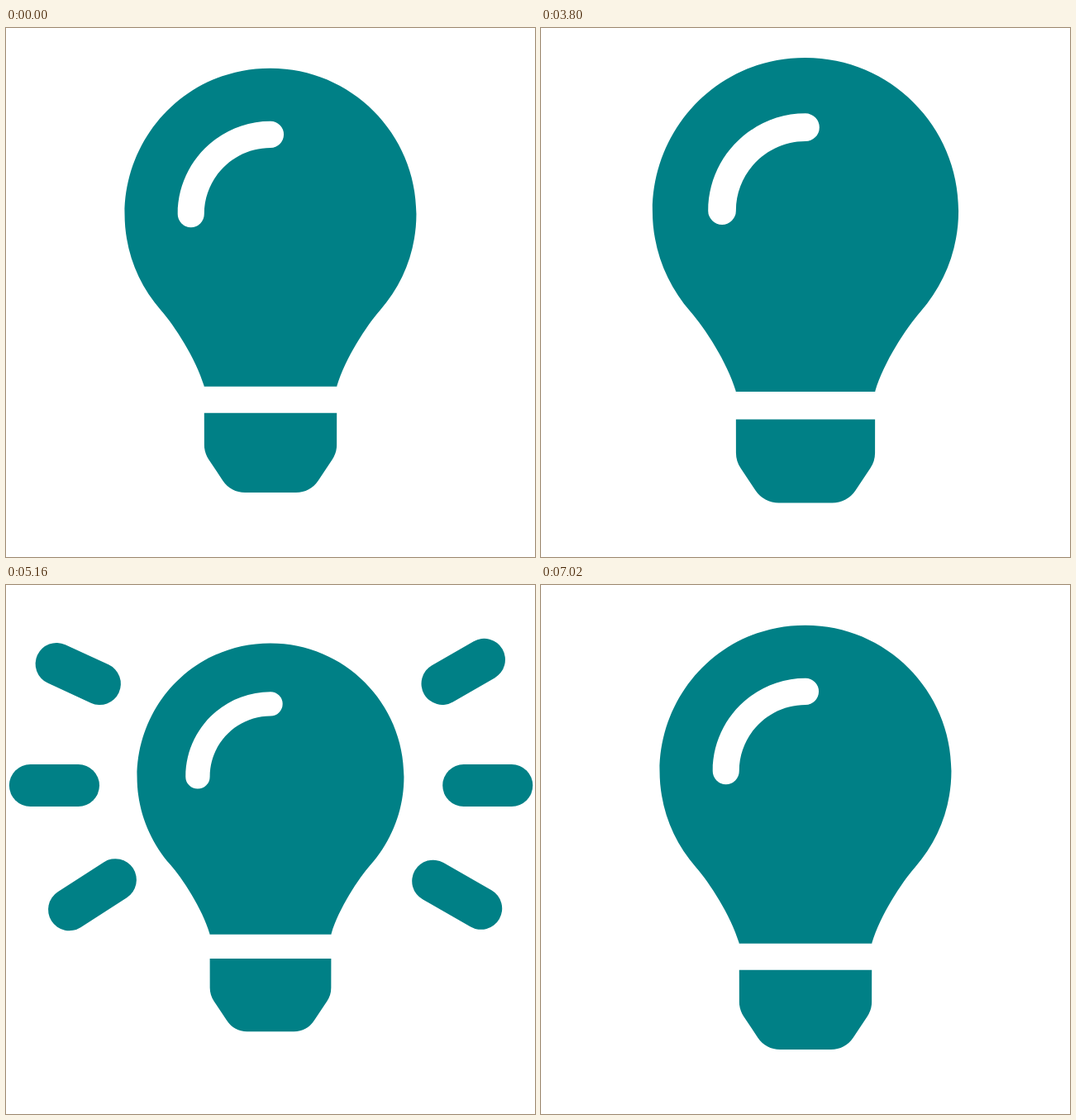
Write an HTML page that moves like this. It is 640 px wide and 640 px high and loops after 7.32 s.

```html
<!DOCTYPE html>
<html lang="en">
<head>
<meta charset="utf-8">
<title>Light bulb</title>
<style>
  html, body { margin: 0; height: 100%; overflow: hidden; background: #fff; }
  svg { display: block; width: 100vw; height: 100vh; }
  #bulb { fill: #008086; }
  #rays { fill: none; stroke: #008086; stroke-width: 51; stroke-linecap: round; }
</style>
</head>
<body>
<svg viewBox="0 0 640 640">
  <g id="rays">
    <path pathLength="1" d="M113.4 119.5L59.3 94.6"/>
    <path pathLength="1" d="M87.5 242.5H27.4"/>
    <path pathLength="1" d="M132.4 356.7L74.6 394"/>
    <path pathLength="1" d="M528 119.4L580.2 89.3"/>
    <path pathLength="1" d="M553.7 242.5H613.8"/>
    <path pathLength="1" d="M516.7 358.2L576.7 392.5"/>
  </g>
  <path id="bulb" d="M96.06 454.35c.01 6.29 1.87 12.45 5.36 17.69l17.09 25.69a32 32 0 0 0 26.64 14.28h61.71
    a32 32 0 0 0 26.64-14.28l17.09-25.69a32 32 0 0 0 5.36-17.69L256 416H96z
    M0 176c0 44.37 16.45 84.85 43.56 115.78 16.52 18.85 42.36 58.23 52.21 91.45l.11.78h160.24l.11-.78
    c9.85-33.22 35.69-72.6 52.21-91.45C335.55 260.85 352 220.37 352 176 352 78.61 272.91-.3 175.45 0
    73.44.31 0 82.97 0 176z
    M176 96c-44.11 0-80 35.89-80 80a16 16 0 0 1-32 0c0-61.76 50.24-112 112-112a16 16 0 0 1 0 32z"/>
</svg>
<script>
const LOOP = 7320, START = 2360, BEAT = 560;
const BEAT_STEPS = [0, 140, 180, 320, 440];

// Key poses of the pulse; soft blends from linear (0) to smooth (1) on the way to the next.
const PULSE = [
  { step: 0, scale: 1.0026, soft: .3 },
  { step: 4, scale: .954, soft: 0 },
  { step: 5.6, scale: .953, soft: .3 },
  { step: 18.5, scale: 1.1, soft: 1 },
  { step: 27, scale: .91, soft: 0 },
  { step: 33, scale: 1.0026, soft: 0 }
];

const bulb = document.getElementById('bulb');
const rays = document.getElementById('rays');

const mix = (a, b, k) => a + (b - a) * k;
const progress = (from, to, x) => Math.min(1, Math.max(0, (x - from) / (to - from)));
const smooth = x => x * x * (3 - 2 * x);
const easeOut = x => 1 - (1 - x) ** 5;

// The picture advances in uneven holds, five to a beat.
function stepAt(time) {
  const t = time - START;
  if (t < 0) return 0;
  return 5 * Math.floor(t / BEAT) + BEAT_STEPS.filter(s => s <= t % BEAT).length;
}

function bulbScale(step) {
  const next = PULSE.findIndex(key => key.step > step);
  if (next < 0) return PULSE[0].scale;
  const a = PULSE[next - 1], b = PULSE[next];
  const x = progress(a.step, b.step, step);
  return mix(a.scale, b.scale, mix(x, smooth(x), a.soft));
}

function draw(step) {
  bulb.setAttribute('transform',
    `translate(320 305.3) scale(${bulbScale(step)}) translate(-176 -256)`);

  const outer = easeOut(progress(17.9, 34.3, step));
  const inner = smooth(progress(29.5, 41.5, step));
  rays.style.visibility = step >= 18 && step <= 42 ? 'visible' : 'hidden';
  rays.style.strokeDasharray = `${Math.max(0, outer - inner)} 3`;
  rays.style.strokeDashoffset = -Math.min(inner, .999);
}

const begin = performance.now();
function tick() {
  draw(stepAt((performance.now() - begin) % LOOP));
  requestAnimationFrame(tick);
}
tick();
</script>
</body>
</html>
```
